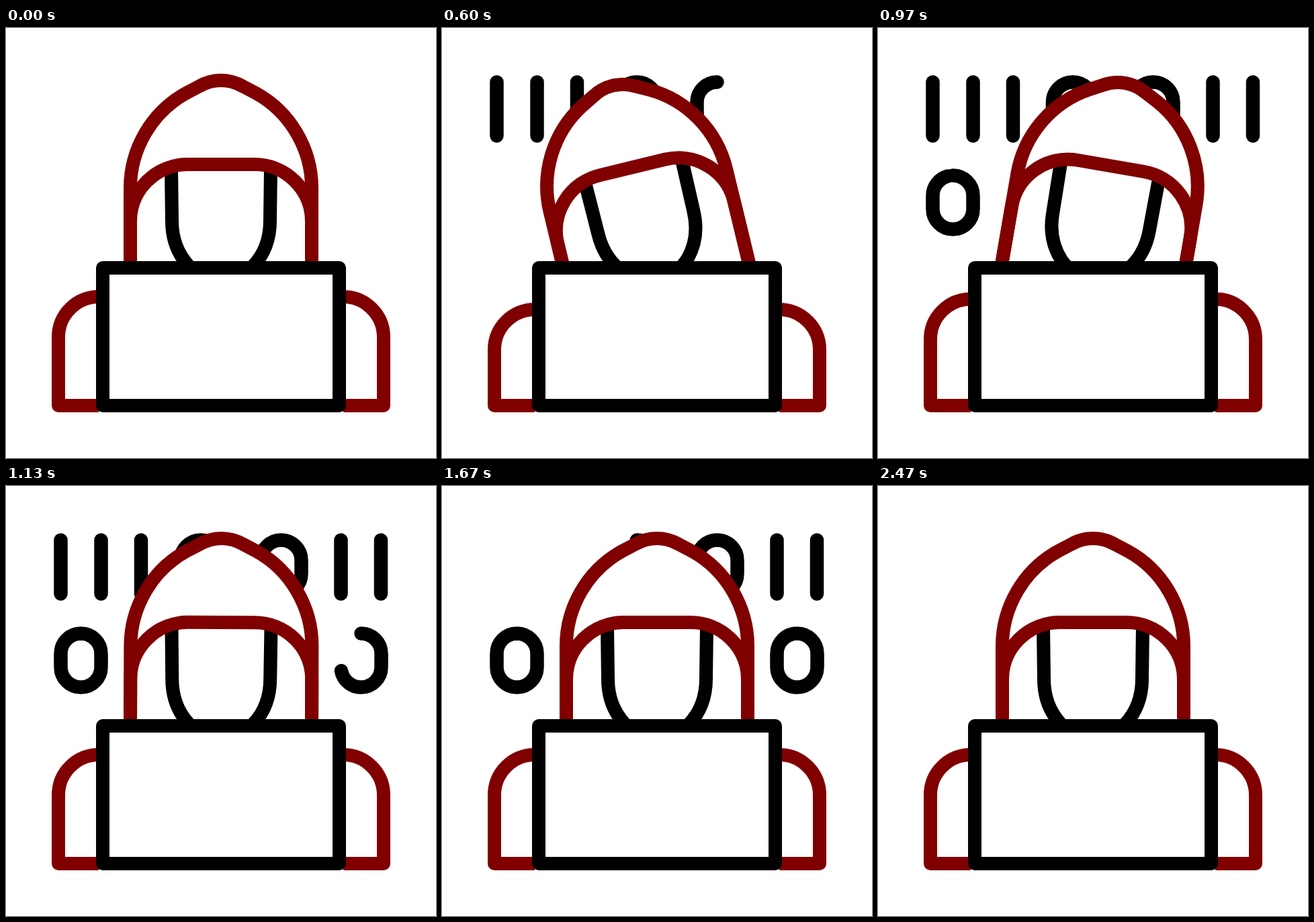
An HTML page that plays this animation: 640x640 px, repeating every 2500 ms.

```html
<!DOCTYPE html>
<html lang="en">
<head>
<meta charset="utf-8">
<title>Hooded figure at a laptop</title>
<style>
  html, body { margin: 0; width: 100%; height: 100%; overflow: hidden; background: #fff; }
  svg { display: block; width: 100vw; height: 100vh; }
  path, rect { fill: none; stroke: #000; stroke-width: 20; stroke-linejoin: round; }
  .coat { stroke: maroon; }
  .solid { fill: #fff; }
  #digits path { stroke-width: 20.5; stroke-linecap: round; }
</style>
</head>
<body>
<svg viewBox="0 0 640 640">
  <g id="digits"></g>
  <path id="left" class="coat"/>
  <path id="right" class="coat"/>
  <g id="head">
    <path class="coat solid" d="M185 400V238C185 180 217 125 268 97L288 86.5C308 75 332 75 352 86.5L372 97C423 125 455 180 455 238V400"/>
    <path d="M246 210L247 287C247 315 257 338 272 354Q320 400 368 354C383 338 393 315 393 287L394 210"/>
    <path class="coat" d="M185 400V288A85 85 0 0 1 270 203H370A85 85 0 0 1 455 288V400"/>
  </g>
  <rect class="solid" x="144" y="357" width="352" height="205"/>
</svg>
<script>
const LOOP = 2500, FPS = 30, TILT = 13.6, DROP = 23.5;
const $ = id => document.getElementById(id);

const bar = x => `M${x} 80.5V160.5`;

// Zero starting at its top; sweep 1 runs clockwise, 0 the other way
function zero(x, y, sweep) {
  const s = sweep ? 1 : -1;
  const arc = (dx, dy) => `a30 30 0 0 ${sweep} ${dx * s} ${dy}`;
  return `M${x} ${y}` + arc(30, 30) + 'v20' + arc(-30, 30) + arc(-30, -30) + 'v-20' + arc(30, -30);
}

// path, drawn from-to, erased from-to (in steps of 1/30 s)
const digits = [
  [bar(81.5), 1, 5.5, 35, 39],
  [bar(141.5), 5.5, 10, 39, 43],
  [bar(201), 10, 13, 43, 46.5],
  [zero(290, 80.5, 0), 13, 16.5, 46.5, 52],
  [zero(409.5, 80.5, 0), 16.5, 20, 51.5, 56],
  [bar(498.5), 20, 22.5, 56, 58.5],
  [bar(558), 22.5, 25, 58.5, 61],
  [zero(111.5, 219.5, 1), 25, 29.15, 61, 65],
  [zero(528.5, 219.5, 1), 31, 35.4, 65, 73.9]
].map(([d, ...times]) => {
  const el = document.createElementNS('http://www.w3.org/2000/svg', 'path');
  el.setAttribute('d', d);
  el.setAttribute('pathLength', 1);
  $('digits').append(el);
  return { el, times };
});

const part = (t, a, b) => Math.min(1, Math.max(0, (t - a) / (b - a)));
const ease = (t, a, b) => {
  const p = part(t, a, b);
  return p * p * (3 - 2 * p);
};

function sleeve(edge, inner, sweep, drop) {
  return `M${inner} 562H${edge}V${460 + drop}A60 60 0 0 ${sweep} ${inner} ${400 + drop}`;
}

function render(ms) {
  const t = Math.floor((ms % LOOP) * FPS / 1000 + 0.15);

  const angle = TILT * (2 * ease(t, 18, 26) - ease(t, 1, 18) - ease(t, 26, 34.6));
  $('head').setAttribute('transform', `rotate(${angle} 320 358)`);

  const drop = DROP * (ease(t, 1, 11.5) - ease(t, 11.5, 34.5));
  $('left').setAttribute('d', sleeve(78, 138, 1, drop));
  $('right').setAttribute('d', sleeve(562, 502, 0, drop));

  for (const { el, times: [a, b, c, d] } of digits) {
    const start = part(t, c, d), len = part(t, a, b) - start;
    el.style.display = len > 0 ? '' : 'none';
    el.style.strokeDasharray = `${len} 2`;
    el.style.strokeDashoffset = -start;
  }
}

const begin = performance.now();
function tick() {
  render(performance.now() - begin);
  requestAnimationFrame(tick);
}
tick();
</script>
</body>
</html>
```
